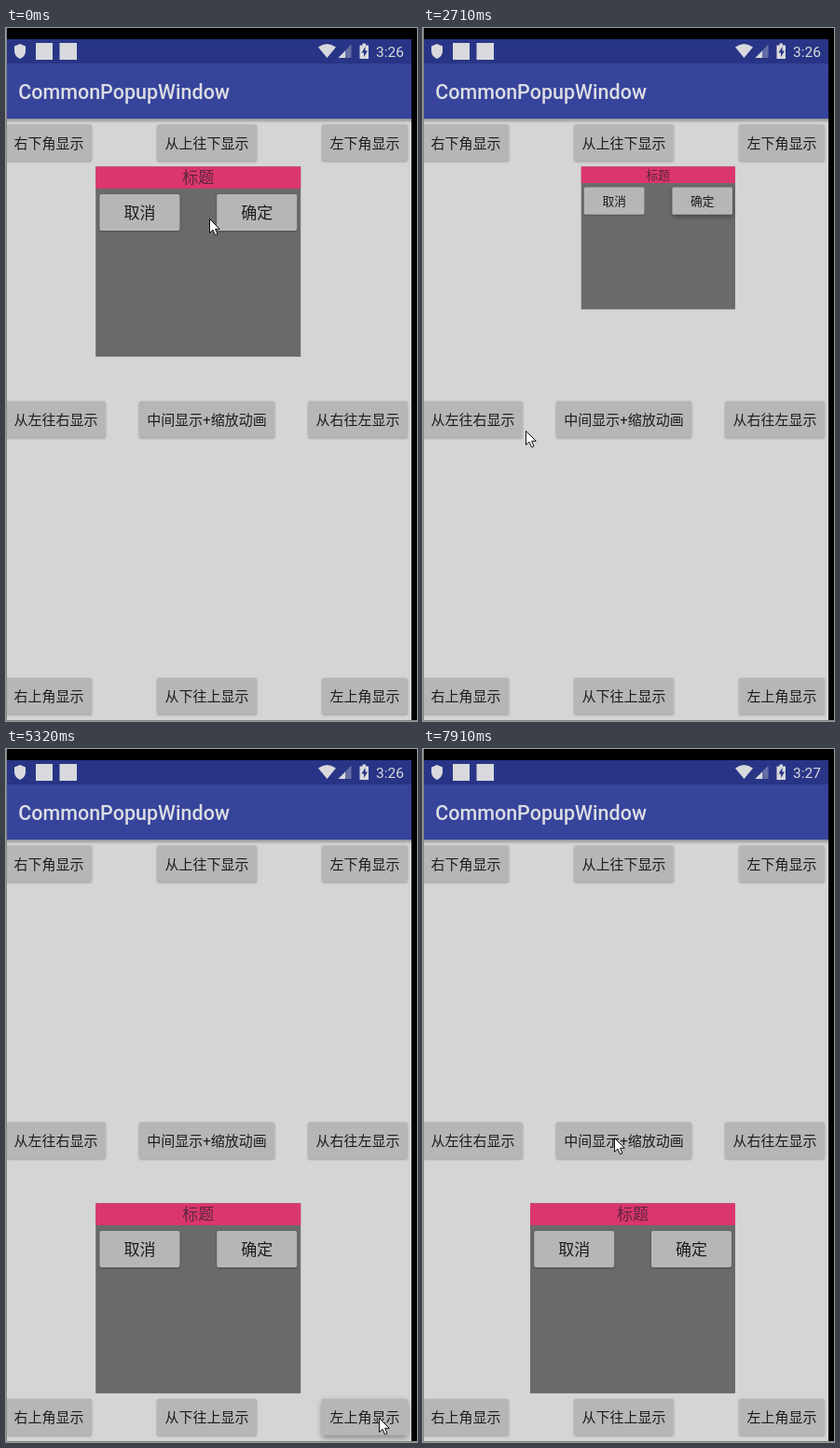
Recreate the animation shown at these times as an HTML page. Size 441x742 px, loop 8000 ms.

```html
<!DOCTYPE html>
<html lang="zh">
<head>
<meta charset="utf-8">
<title>CommonPopupWindow</title>
<style>
  html, body { margin: 0; width: 100%; height: 100%; overflow: hidden; background: #000; }
  svg { display: block; width: 441px; height: 742px; }
  text { font-family: Roboto, "Noto Sans CJK SC", "Noto Sans CJK", sans-serif; fill: #1c1c1c; }
  .mid { text-anchor: middle; }
  .page { font-size: 15px; }
  .popup { font-size: 17px; }
  .face { fill: #b5b7b7; filter: drop-shadow(0 1.2px 1px rgba(0, 0, 0, .28)); }
  .raised .face { filter: drop-shadow(0 3px 3px rgba(0, 0, 0, .36)); }
  .dark .face { fill: #a3a5a5; }
  .icon, .icon text { fill: #d8d9dd; }
  .caption { fill: #5c2740; }
  .title { fill: #dcdde3; font-size: 21.5px; font-weight: 500; }
</style>
</head>
<body>
<svg viewBox="0 0 441 742">
  <defs>
    <linearGradient id="shade" x2="0" y2="1">
      <stop stop-color="#000" stop-opacity=".32"/>
      <stop offset="1" stop-color="#000" stop-opacity="0"/>
    </linearGradient>
    <clipPath id="screen"><path d="M0 12H435V742H0z"/></clipPath>
  </defs>
  <rect width="441" height="742"/>
  <g clip-path="url(#screen)">
    <rect y="12" width="435" height="730" fill="#d5d5d5"/>
    <rect y="12" width="435" height="26" fill="#283586"/>
    <rect y="38" width="435" height="59" fill="#37449b"/>
    <rect y="97" width="435" height="5" fill="url(#shade)"/>
    <g class="icon">
      <path d="M15 17l6 2.5v5c0 4-2.5 7-6 8.5c-3.500-1.500-6-4.500-6-8.500v-5z"/>
      <path d="M32 16h18v18h-18zM57.500 16h18.500v18h-18.500z"/>
      <path d="M335 20.500Q344.500 13.500 354 20.500L344.500 32z"/>
      <path d="M370.500 17.500V32H356.500z" opacity=".35"/>
      <path d="M364 24.500V32H356.500z"/>
      <path d="M382.500 18.500v-2h3.500v2h3v14.500h-9.500v-14.500z"/>
      <text id="clock" x="397" y="31" font-size="15.500">3:26</text>
    </g>
    <path d="M385.500 20l-4 6.500h2.500v4.500l4-6.500h-2.500z" fill="#283586"/>
    <text class="title" x="13.200" y="76">CommonPopupWindow</text>
    <g id="buttons" class="page"></g>
    <g id="popups" class="popup"></g>
  </g>
  <path d="M.5 0V742M0 741.500H441" stroke="#858585"/>
  <path id="cursor" d="M.5.5V15.500L4 12.200L6.500 17.800L9 16.700L6.600 11.300H11.300z" fill="#fff" stroke="#111" stroke-linejoin="round"/>
</svg>
<script>
const LOOP = 8000, REFRESH = 136, PHASE = 114;
const SCALE_TIME = 400, MOVE_TIME = 380;
const POPUP_W = 220, POPUP_H = 203.5;
const byId = id => document.getElementById(id);

const LABELS = [
  '右下角显示', '从上往下显示', '左下角显示',
  '从左往右显示', '中间显示+缩放动画', '从右往左显示',
  '右上角显示', '从下往上显示', '左上角显示'
];

// right and bottom pick the corner; answer is the button that closes it.
const POPUPS = [
  { right: 0, bottom: 0, open: -LOOP, close: 577, answer: 0 },
  { right: 1, bottom: 0, open: 1690, close: 2565, answer: 1 },
  { right: 0, bottom: 1, open: 4150, close: 5345 },
  { right: 1, bottom: 1, open: 5450, close: 2 * LOOP }
];

// Each move: start time and destination.
const HOME = [218, 204];
const MOVES = [
  [140, 170, 203], [530, 366, 132], [1860, 292, 190],
  [2300, 110, 431], [3420, 65, 707], [4520, 400, 716],
  [5700, 345, 645], [6180, 172, 399], [7400, 205, 416]
];

const button = (label, x, y, w, textY) =>
  `<g><rect class="face" x="${x}" y="${y}" width="${w}" height="39" rx="2"/>
   <text class="mid" x="${x + w / 2}" y="${textY}">${label}</text></g>`;

byId('buttons').innerHTML = LABELS.map((label, i) => {
  const col = i % 3, row = Math.floor(i / 3);
  const w = 17 + 15 * label.length - (label.includes('+') ? 6.5 : 0);
  const x = [0, 215.5 - w / 2, 431 - w][col];
  return button(label, x, 103.2 + 296.3 * row, w, 129 + 296 * row);
}).join('');

byId('popups').innerHTML = POPUPS.map(() =>
  `<g>
    <rect width="${POPUP_W}" height="${POPUP_H}" fill="#6a6a6a"/>
    <rect width="${POPUP_W}" height="23.500" fill="#db366d"/>
    <text class="mid caption" x="110" y="18">标题</text>
    ${button('取消', 4.2, 29.5, 86, 55.5)}${button('确定', 130, 29.5, 86, 55.5)}
  </g>`).join('');

const buttonNodes = byId('buttons').children;
const popupNodes = byId('popups').children;

const ease = (t, duration) => {
  const p = Math.min(1, Math.max(0, t / duration));
  return (1 - Math.cos(Math.PI * p)) / 2;
};

const cursorAt = t => MOVES.reduce(([x, y], [start, toX, toY]) => {
  const k = ease(t - start, MOVE_TIME);
  return [x + (toX - x) * k, y + (toY - y) * k];
}, HOME).map(Math.round);

function press(node, t, down, dark, up) {
  node.classList.toggle('raised', t >= down && t < up);
  node.classList.toggle('dark', t >= dark && t < up);
}

function drawPopup({ right, bottom, open, close, answer }, node, t) {
  const s = Math.min(ease(t - open, SCALE_TIME), 1 - ease(t - close, SCALE_TIME));
  const x = 96.2 + 18.8 * right + POPUP_W * right * (1 - s);
  const y = 148.4 + 338 * bottom + POPUP_H * bottom * (1 - s);
  node.style.display = s > 0 ? '' : 'none';
  node.setAttribute('transform', `translate(${x} ${y}) scale(${s})`);

  const trigger = buttonNodes[6 * bottom + 2 * right];
  press(trigger, t, open - 180, open, open + 200);
  if (answer !== undefined) {
    const choice = node.querySelectorAll('g')[answer];
    press(choice, t, close - 150, Infinity, close + SCALE_TIME);
  }
}

function draw(t) {
  byId('cursor').setAttribute('transform', `translate(${cursorAt(t)})`);
  byId('clock').textContent = t < 5700 ? '3:26' : '3:27';
  POPUPS.forEach((popup, i) => drawPopup(popup, popupNodes[i], t));
}

const start = performance.now();
function frame() {
  const t = (performance.now() - start) % LOOP;
  draw(PHASE + REFRESH * Math.floor((t - PHASE) / REFRESH));
  requestAnimationFrame(frame);
}
frame();
</script>
</body>
</html>
```
